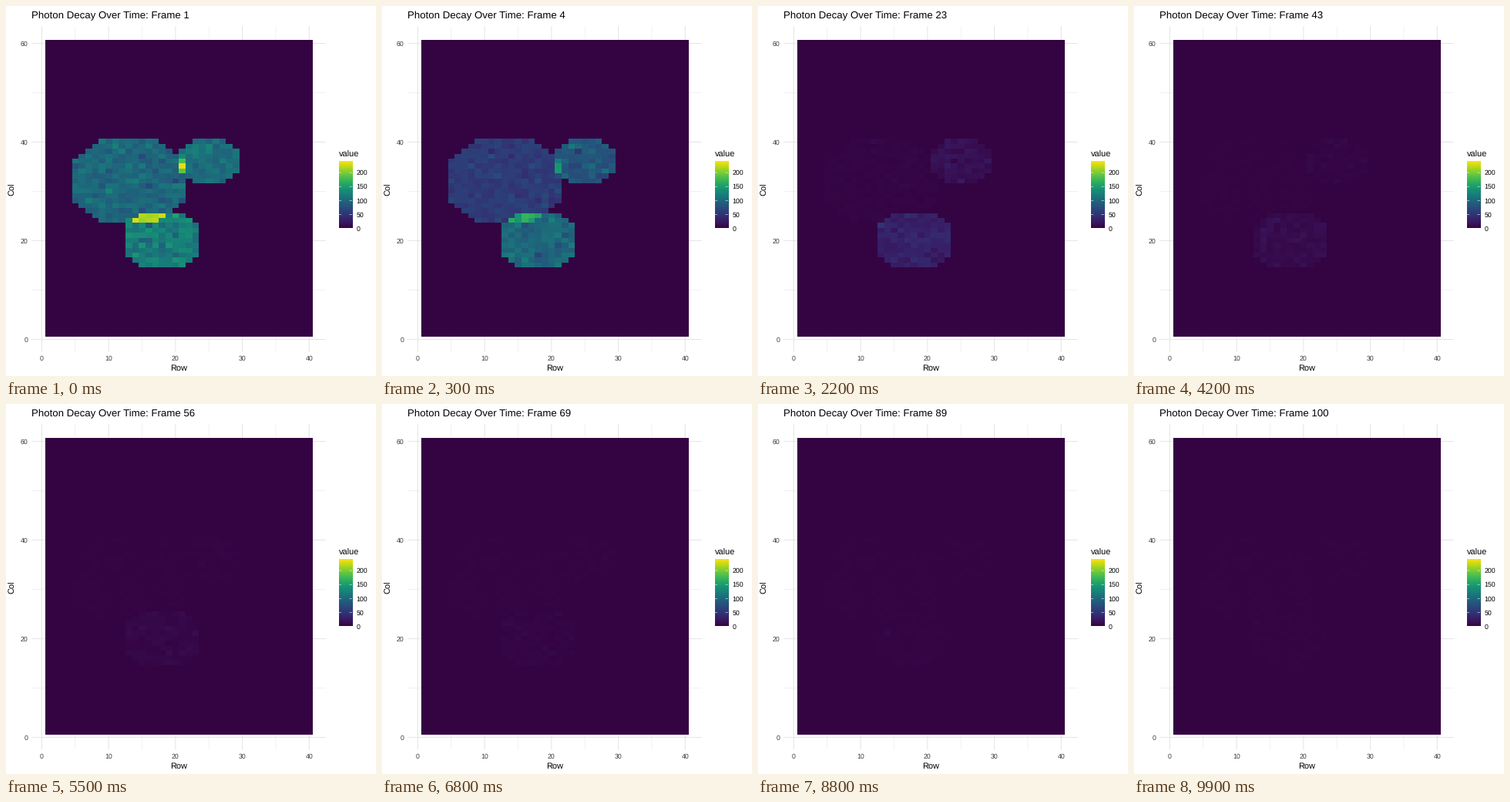
A matplotlib script for the animation above (10000 ms loop, 480x480 px).

```python
import numpy as np
import matplotlib as mpl
import matplotlib.pyplot as plt
from matplotlib.animation import FuncAnimation
from matplotlib.colors import ListedColormap

SIZE, DPI = 480, 72
FRAMES, INTERVAL = 100, 100
NX, NY, VMAX = 40, 60, 238.6

mpl.rcParams["font.family"] = "Liberation Sans"
mpl.rcParams["text.hinting"] = "none"


def tone(c):
    """sRGB level to a gamma 1.8 display space."""
    c = np.asarray(c, float)
    lin = np.where(c <= 0.04045, c / 12.92, ((c + 0.055) / 1.055) ** 2.4)
    return lin ** (1 / 1.8)


def gray(level):
    return (float(tone(level / 255)),) * 3


CMAP = ListedColormap(tone(mpl.colormaps["viridis"](np.linspace(0, 1, 256))[:, :3]))
GRID, TICK_TEXT = gray(235), gray(77)

# centre x, centre y, radius, starting photons, lifetime in frames
DISCS = [
    (13, 32, 9, 98, 5.3),
    (25, 36, 5, 105, 10.5),
    (18, 20, 6, 118, 16.0),
]
col, row = np.meshgrid(np.arange(1, NX + 1), np.arange(1, NY + 1))
MASKS = [(col - x) ** 2 + (row - y) ** 2 < r * r for x, y, r, _, _ in DISCS]
RESIDUE = np.any(MASKS, axis=0) & (np.random.default_rng(5).random((NY, NX)) < 0.3)


def photons(t):
    mean = sum(m * n * np.exp(-t / life)
               for m, (_, _, _, n, life) in zip(MASKS, DISCS))
    counts = np.random.default_rng(300 + t).poisson(mean)
    return np.maximum(counts, RESIDUE)


def px(v):
    return 46.4 + 8.673 * v


def py(v):
    return 432.5 - 6.4 * v


fig = plt.figure(figsize=(SIZE / DPI, SIZE / DPI), dpi=DPI, facecolor="white")
ax = fig.add_axes([0, 0, 1, 1])


def line(xs, ys, color, width, z=1):
    ax.plot(xs, ys, color=color, lw=width, solid_capstyle="butt", snap=False, zorder=z)


def label(x, y, s, size, color="black", **kw):
    return ax.text(x, y, s, fontsize=size, color=color, **kw)


LEFT, RIGHT, TOP, BOTTOM = px(-1.5), px(42.5), py(63.5), py(-2.5)
for v in range(0, 41, 5):
    line([px(v)] * 2, [TOP, BOTTOM], GRID, 0.53 if v % 10 else 1.07)
for v in range(0, 61, 10):
    line([LEFT, RIGHT], [py(v)] * 2, GRID, 0.53 if v % 20 else 1.07)
for v in range(0, 41, 10):
    label(px(v), 460, str(v), 8.8, TICK_TEXT, ha="center")
for v in range(0, 61, 20):
    label(28.5, py(v) + 3.2, str(v), 8.8, TICK_TEXT, ha="right")

label((LEFT + RIGHT) / 2, 473, "Row", 11, ha="center")
label(13.4, (TOP + BOTTOM) / 2, "Col", 11, rotation=90, ha="right", va="center")
title = label(LEFT, 16, "", 13.2)

heat = ax.imshow(photons(0), cmap=CMAP, vmin=0, vmax=VMAX, origin="lower",
                 extent=(px(0.5), px(40.5), py(0.5), py(60.5)),
                 interpolation="nearest", aspect="auto", zorder=2)

# Colour bar
BAR_L, BAR_R, BAR_T, BAR_B = 431.7, 449, 202.1, 288.5
ax.imshow(np.linspace(0, 1, 300)[:, None], cmap=CMAP, origin="lower",
          extent=(BAR_L, BAR_R, BAR_B, BAR_T), interpolation="nearest",
          aspect="auto", zorder=2)
label(BAR_L, 196, "value", 11)
for v in range(0, 201, 50):
    y = BAR_B - (BAR_B - BAR_T) * v / VMAX
    line([BAR_L, BAR_L + 3.46], [y, y], "white", 0.53, 3)
    line([BAR_R - 3.46, BAR_R], [y, y], "white", 0.53, 3)
    label(454.5, y + 3.2, str(v), 8.8)

ax.set_xlim(0, SIZE)
ax.set_ylim(SIZE, 0)
ax.axis("off")


def update(t):
    heat.set_data(photons(t))
    title.set_text(f"Photon Decay Over Time: Frame {t + 1}")
    return heat, title


anim = FuncAnimation(fig, update, frames=FRAMES, interval=INTERVAL,
                     repeat=True, repeat_delay=0)
plt.show()
```
